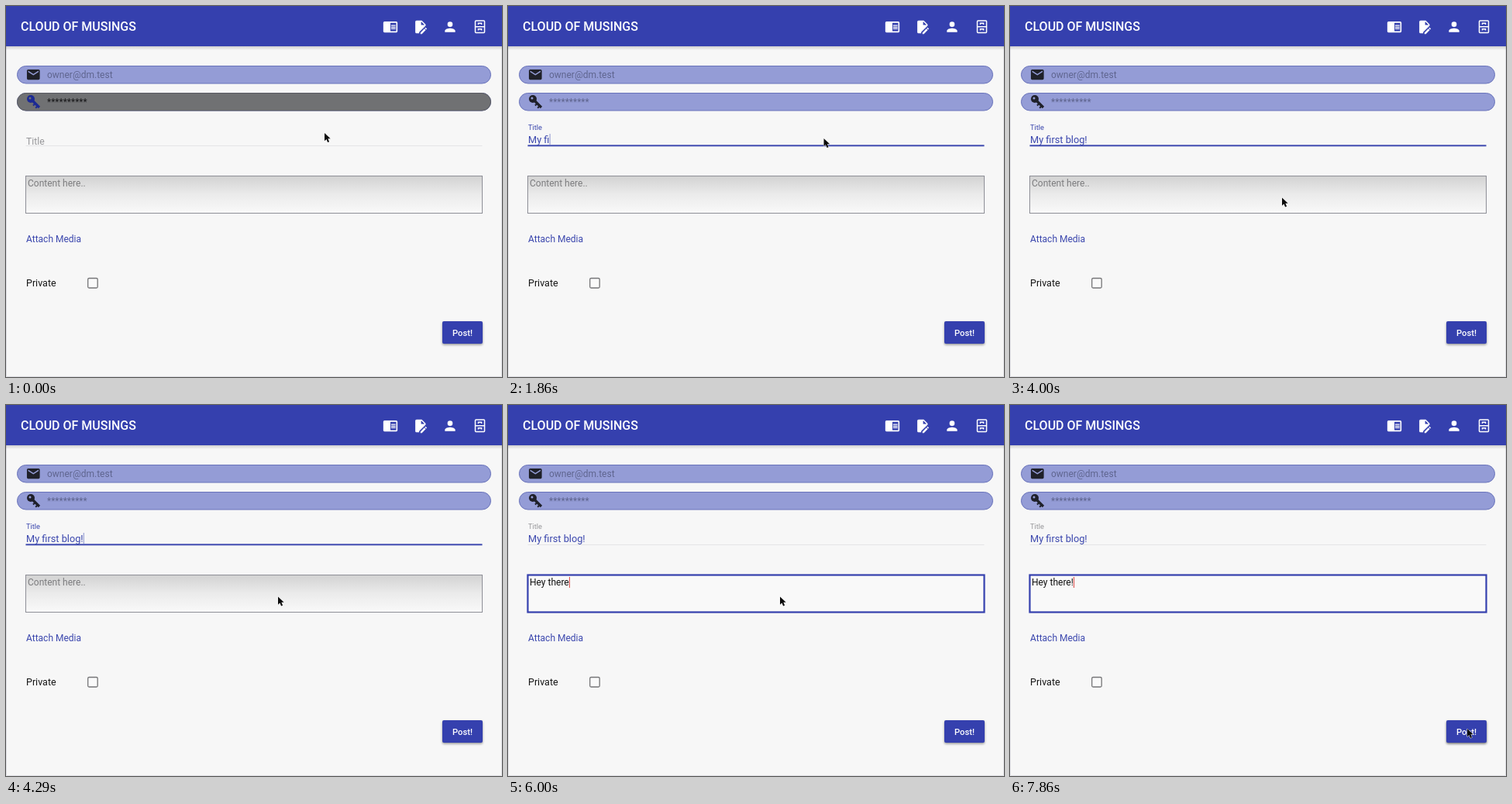
These frames come from a looping animation (640 by 479 pixels, 8 s). An HTML page:

```html
<!DOCTYPE html>
<html lang="en">
<head>
<meta charset="utf-8">
<title>Blog form</title>
<style>
  html, body { margin: 0; width: 100%; height: 100%; overflow: hidden; background: #f7f7f7; }
  svg { display: block; width: 100%; height: 100%; }
  text { font: 12px Roboto, sans-serif; white-space: pre; }
  .brand { font-size: 16px; font-weight: 500; }
  .btn { font-size: 11.2px; font-weight: 500; }
  .pill { fill: #949cd6; stroke: #6973ba; }
  .hint { fill: #5f658f; }
</style>
</head>
<body>
<svg viewBox="0 0 640 479">
  <defs>
    <linearGradient id="shade" x2="0" y2="1">
      <stop offset="0" stop-color="#d2d2d2"/>
      <stop offset=".5" stop-color="#ebebeb"/>
      <stop offset="1" stop-color="#f9f9f9"/>
    </linearGradient>
    <linearGradient id="drop" x2="0" y2="1">
      <stop offset="0" stop-color="#000" stop-opacity=".16"/>
      <stop offset="1" stop-color="#000" stop-opacity="0"/>
    </linearGradient>
    <filter id="soft" x="-20%" y="-30%" width="140%" height="170%"><feGaussianBlur stdDeviation="1.6"/></filter>
    <g id="key">
      <path d="M35 123L43 131" stroke="currentColor" stroke-width="3.2"/>
      <path d="M37 126.500l-2 2M40.200 129.700l-2 2" stroke="currentColor" stroke-width="2"/>
      <circle cx="32" cy="120" r="5" fill="currentColor"/>
    </g>
  </defs>

  <rect width="640" height="479" fill="#f7f7f7"/>
  <path d="M.5 52V478.500H639.500V52" fill="none" stroke="#dedee2"/>
  <rect y="52" width="640" height="5" fill="url(#drop)"/>
  <rect width="640" height="52" fill="#3540ae"/>
  <text class="brand" x="19" y="32" fill="#fff">CLOUD OF MUSINGS</text>

  <g fill="#fff">
    <path transform="translate(486 16.700) scale(.833)" d="M13 12h7v1.500h-7zm0-2.500h7V11h-7zm0 5h7V16h-7zM21 4H3c-1.100 0-2 .9-2 2v13c0 1.100.9 2 2 2h18c1.100 0 2-.9 2-2V6c0-1.100-.9-2-2-2zm0 15h-9V6h9v13z"/>
    <path transform="translate(524.800 17) scale(.833)" d="M6 2C4.900 2 4 2.900 4 4V20A2 2 0 0 0 6 22H10V20.100L20 10.100V8L14 2H6M13 3.500L18.500 9H13V3.500M20.100 13L18.700 14.200L20.800 16.300L22 14.900ZM18.100 14.800L12 20.900V23H14.100L20.200 16.900Z"/>
    <path transform="translate(563 17) scale(.833)" d="M12 12a4 4 0 1 0 0-8a4 4 0 0 0 0 8zm0 2c-2.670 0-8 1.340-8 4v2h16v-2c0-2.660-5.330-4-8-4z"/>
  </g>
  <path d="M606.500 19h10q1 0 1 1v13.500q0 1-1 1h-10q-1 0-1-1V20q0-1 1-1zM605.500 26.800h12M609.500 24v-1.700h4V24M609.500 31.500v-1.700h4v1.700" fill="none" stroke="#fff" stroke-width="1.500"/>

  <rect class="pill" x="14.500" y="77.500" width="611" height="22.500" rx="11.200"/>
  <path transform="translate(25.300 78.600) scale(.833)" fill="#1f2029" d="M20 4H4a2 2 0 0 0-2 2v12a2 2 0 0 0 2 2h16a2 2 0 0 0 2-2V6a2 2 0 0 0-2-2zm0 4l-8 5-8-5V6l8 5 8-5v2z"/>
  <text class="hint" x="53" y="93">owner@dm.test</text>

  <rect class="pill" x="14.500" y="112.500" width="611" height="22.500" rx="11.200"/>
  <use href="#key" color="#1f2029"/>
  <circle cx="31" cy="119" r="1.500" fill="#949cd6"/>
  <text class="hint" x="53" y="128">**********</text>
  <g id="hover">
    <rect x="14.500" y="112.500" width="611" height="22.500" rx="11.200" fill="#707173" stroke="#5a5b63"/>
    <use href="#key" color="#1c2a94"/>
    <circle cx="31" cy="119" r="1.500" fill="#707173"/>
    <text x="53" y="128" fill="#1a1a1c">**********</text>
  </g>

  <text id="label" x="26">Title</text>
  <rect x="25.500" y="180" width="589" height="1" fill="#e4e4e6"/>
  <rect id="line" y="179.300" height="2" fill="#3f4bb0"/>
  <text id="title" x="26" y="176.500" fill="#3a46ad" style="font-size:12.750px"></text>
  <rect id="titleCaret" y="165" width="1" height="14" fill="#8c95cf"/>

  <rect id="area" x="25.500" y="219.500" width="589" height="48"/>
  <text id="content" x="28" y="233"></text>
  <rect id="contentCaret" y="222" width="1" height="14" fill="#dc4a48"/>

  <text x="26" y="304.500" fill="#3a46ad">Attach Media</text>
  <text x="26" y="362" fill="#151515" style="font-size:12.500px">Private</text>
  <rect x="105.700" y="351.500" width="12.500" height="12.500" rx="1.500" fill="#fafafa" stroke="#767678" stroke-width="1.300"/>

  <rect id="glow" x="563" y="408.500" width="52" height="29" rx="2" fill="#000" filter="url(#soft)"/>
  <rect x="563" y="407" width="52" height="29" rx="2" fill="#3540ae"/>
  <text class="btn" x="576" y="425.500" fill="#fff">Post!</text>

  <path id="cursor" d="M0 0v10.300l2.400-2.200 1.700 4 2-.85-1.700-3.900h3.300z" fill="#0c0c0c" stroke="#fff" stroke-width=".9" paint-order="stroke"/>
</svg>
<script>
const LOOP = 8000, STEPS = 56;
const TITLE = 'My first blog!', CONTENT = 'Hey there!';
const KEYS = [33, 34, 35, 36, 37, 39, 40, 41, 42, 44]; // steps at which content letters land
const PATH = [[0, 411, 164], [2, 407.5, 171], [24, 407.5, 171], [28, 351, 247.5], [45, 351, 247.5], [53, 590, 418]];
const CLICK = 2, FOCUS = 31;

const $ = id => document.getElementById(id);
const set = (id, attrs) => { for (const a in attrs) $(id).setAttribute(a, attrs[a]); };
const clamp = v => Math.max(0, Math.min(1, v));
const ease = v => v * v * (3 - 2 * v);
const ramp = (k, from, to) => ease(clamp((k - from) / (to - from)));
const lit = (k, since) => k < since || Math.floor((k - since) / 3.5) % 2 === 0;

function pointer(k) {
  const i = PATH.findIndex(p => p[0] > k);
  if (i < 0) return PATH[PATH.length - 1].slice(1);
  const [a, x, y] = PATH[i - 1], [b, u, v] = PATH[i];
  const p = ramp(k, a, b);
  return [x + (u - x) * p, y + (v - y) * p];
}

function type(id, text, on) {
  const el = $(id);
  if (el.textContent !== text) el.textContent = text;
  const width = text ? el.getComputedTextLength() : 0;
  set(id + 'Caret', { x: +el.getAttribute('x') + width + .2, opacity: on ? 1 : 0 });
}

function draw(k) {
  const inContent = k >= FOCUS, inTitle = k > CLICK && !inContent;
  set('hover', { opacity: 1 - ramp(k, 0, 3) });

  const up = ramp(k, CLICK, 5);
  set('label', { y: 178.5 - 18.5 * up, fill: inTitle ? '#3a46ad' : '#97979a' });
  $('label').style.fontSize = 12.2 - 2.9 * up + 'px';
  const span = inContent ? 0 : 589 * up;
  set('line', { x: 320 - span / 2, width: span });
  type('title', TITLE.slice(0, Math.max(0, k - 8)), inTitle && k > 5 && lit(k, 22));

  set('area', inContent
    ? { fill: '#f9f9f9', stroke: '#3540ae', 'stroke-width': 2.2 }
    : { fill: 'url(#shade)', stroke: '#8e8f97', 'stroke-width': 1 });
  const typed = CONTENT.slice(0, KEYS.filter(s => s <= k).length);
  type('content', typed, inContent && lit(k, 45));
  if (!typed) $('content').textContent = 'Content here..';
  set('content', { fill: typed ? '#111' : '#7c7c7e' });

  set('glow', { opacity: k >= 53 ? .55 : .4 });
  set('cursor', { transform: `translate(${pointer(k)})` });
}

function tick() {
  const t = performance.now() % LOOP;
  draw(Math.floor((t + 5) / LOOP * STEPS) % STEPS);
  requestAnimationFrame(tick);
}
tick();
</script>
</body>
</html>
```
